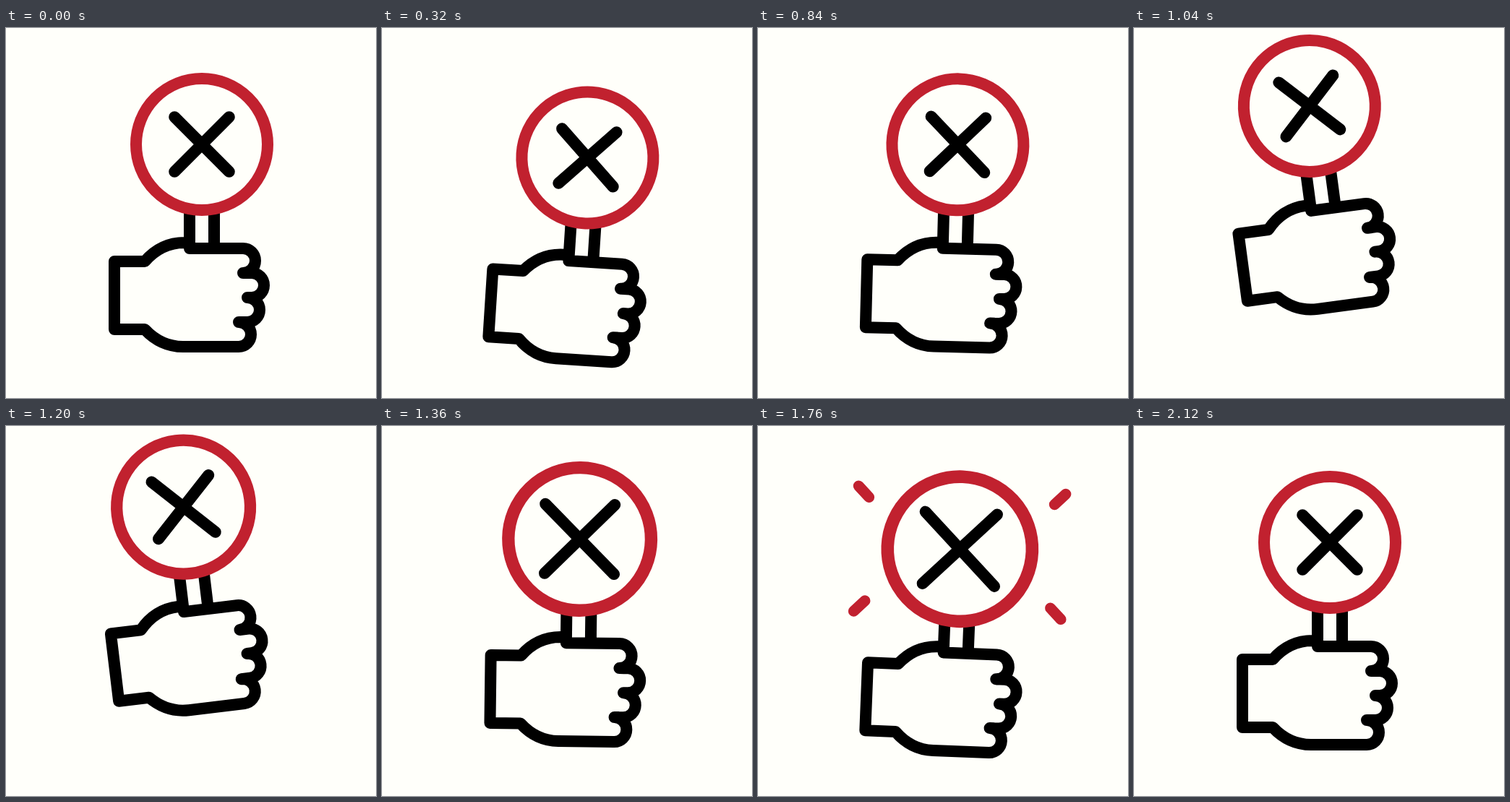
Animation of 512x512 px, one loop 2160 ms. Source, as an HTML page with a canvas:

```html
<!DOCTYPE html>
<html lang="en">
<head>
<meta charset="utf-8">
<title>Hand with a cross sign</title>
<style>
html, body { margin: 0; width: 100%; height: 100%; overflow: hidden; background: #fffffa; }
canvas { display: block; width: 100vw; height: 100vh; }
</style>
</head>
<body>
<canvas id="stage" width="512" height="512"></canvas>
<script>
const ctx = document.getElementById('stage').getContext('2d');
const PAPER = '#fffffa', RED = '#c1212f', INK = '#000';
const LOOP = 2160, STEP = 40, TAU = Math.PI * 2;
const PIVOT = { x: 256, y: 372 }, SIGN = { x: 271, y: 161 };

// [time, value] pairs, eased in and out between neighbours
const TILT = [[0, 0], [20, 0], [640, 7.7], [1110, -8.5], [1500, 4.4], [2030, 0]];
const LIFT = [[0, 0], [20, 0], [640, 36], [1110, -58], [1500, 16.5], [2030, 0]];
const SWELL = [[0, 0], [1120, 0], [1420, 0.95], [1720, 1], [1780, 1], [2100, 0]];

const hand = new Path2D(
  'M247 297C222 297 205 308 192 323H150V417H192C206 432 223 441 245 441H322' +
  'A17 17 0 0 0 322 407H334A17 17 0 0 0 334 373H340A17 17 0 0 0 340 339H328' +
  'A17 17 0 0 0 328 305H254V250M288 250V304M322 407H328M334 373H340M328 339H334');

const ease = p => (1 - Math.cos(Math.PI * p)) / 2;
const ramp = (t, a, b) => Math.min(1, Math.max(0, (t - a) / (b - a)));

function track(keys, t) {
  for (let i = 1; i < keys.length; i++) {
    const [t0, v0] = keys[i - 1], [t1, v1] = keys[i];
    if (t < t1) return v0 + (v1 - v0) * ease((t - t0) / (t1 - t0));
  }
  return keys[keys.length - 1][1];
}

function line(x1, y1, x2, y2) {
  ctx.beginPath();
  ctx.moveTo(x1, y1);
  ctx.lineTo(x2, y2);
  ctx.stroke();
}

function drawRays(t) {
  const outer = 118 + 56 * ramp(t, 1560, 2000);
  const inner = 118 + 56 * ramp(t, 1680, 2110);
  if (outer - inner < 0.5) return;
  ctx.strokeStyle = RED;
  ctx.lineWidth = 15;
  for (const sx of [-1, 1]) {
    for (const sy of [-1, 1]) {
      line(sx * inner, 5 + sy * (inner - 56.7), sx * outer, 5 + sy * (outer - 56.7));
    }
  }
}

function drawSign(swell) {
  const scale = 1 + 0.1 * swell;
  ctx.beginPath();
  ctx.arc(0, 0, 91 * scale, 0, TAU);
  ctx.fillStyle = PAPER;
  ctx.fill();
  ctx.strokeStyle = RED;
  ctx.lineWidth = 16 * scale;
  ctx.stroke();

  const arm = 37.8 * (1 + 0.315 * swell);
  ctx.strokeStyle = INK;
  ctx.lineWidth = 16;
  line(-arm, -arm, arm, arm);
  line(-arm, arm, arm, -arm);
}

function draw(t) {
  ctx.setTransform(1, 0, 0, 1, 0, 0);
  ctx.fillStyle = PAPER;
  ctx.fillRect(0, 0, 512, 512);
  ctx.lineCap = ctx.lineJoin = 'round';

  ctx.translate(PIVOT.x, PIVOT.y + track(LIFT, t));
  ctx.rotate(track(TILT, t) * Math.PI / 180);
  ctx.translate(-PIVOT.x, -PIVOT.y);
  ctx.strokeStyle = INK;
  ctx.lineWidth = 16;
  ctx.stroke(hand);

  ctx.translate(SIGN.x, SIGN.y);
  drawRays(t);
  drawSign(track(SWELL, t));
}

const start = performance.now();
function tick() {
  const t = (performance.now() - start) % LOOP;
  draw(Math.floor(t / STEP) * STEP);
  requestAnimationFrame(tick);
}
tick();
</script>
</body>
</html>
```
